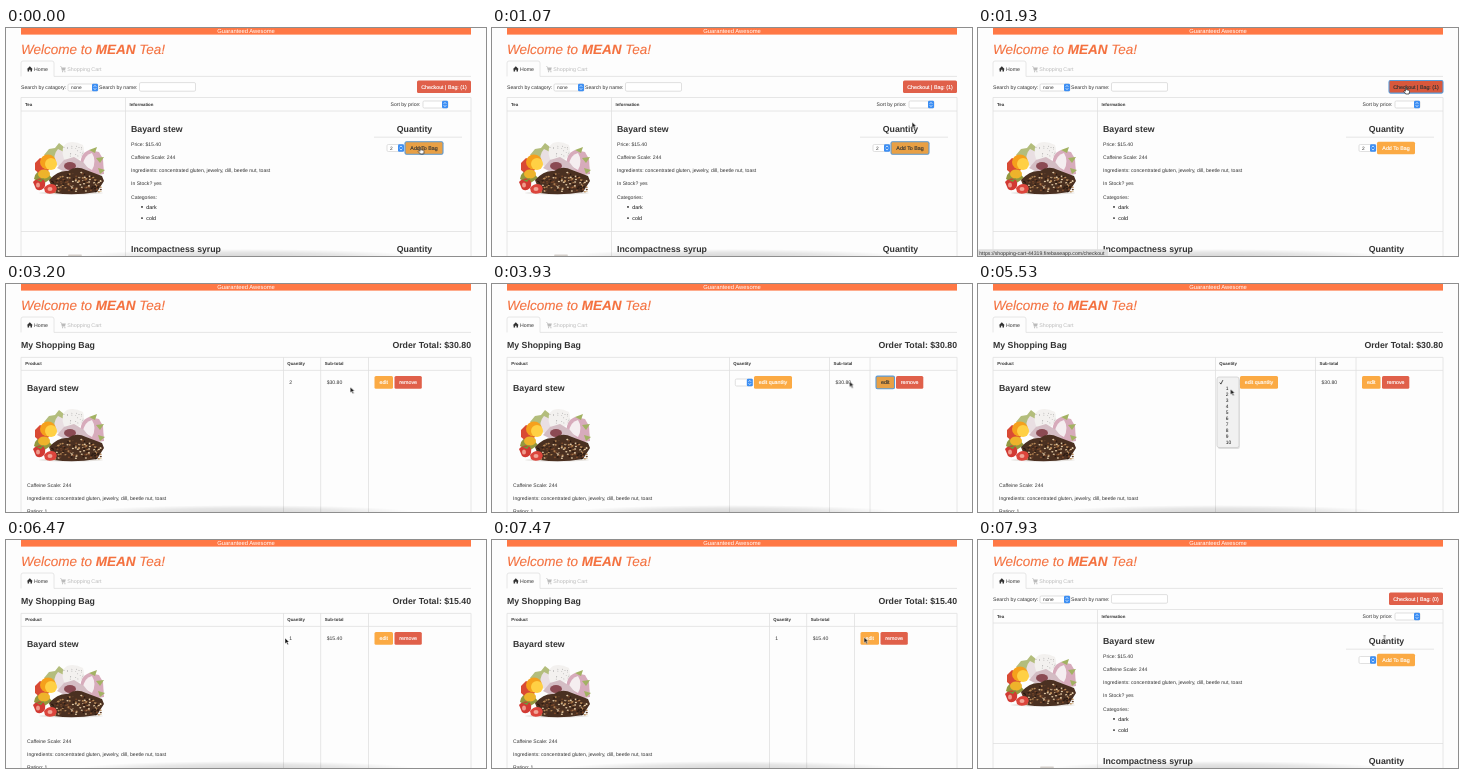
Write an HTML page that moves like this. It is 480 px wide and 228 px high and loops after 8000 ms.

```html
<!DOCTYPE html>
<html lang="en">
<head>
<meta charset="utf-8">
<title>Tea shop</title>
<style>
html, body { margin: 0; width: 100%; height: 100%; overflow: hidden; background: #fdfdfd; }
svg { display: block; width: 100%; height: 100%; }
text { font: 5.1px "Liberation Sans", Arial, sans-serif; fill: #333; text-rendering: geometricPrecision; white-space: pre; }
.title { font-size: 13.5px; font-style: italic; fill: #f4713f; stroke: #f4713f; stroke-width: .12; }
.h { font-size: 8.75px; font-weight: bold; }
.th { font-size: 4.35px; font-weight: bold; }
.btn { font-size: 5.3px; text-anchor: middle; stroke-width: .15; }
.mid { text-anchor: middle; }
.end { text-anchor: end; }
.line { fill: none; stroke: #e0e0e0; stroke-width: .8; }
.field { fill: #fff; stroke: #ccc; stroke-width: .6; }
.cursor { animation: travel 8s ease-in-out infinite; }
@keyframes travel {
  0%, 9% { transform: translate(414.5px, 119px); }
  18.75%, 33.75% { transform: translate(428px, 59px); }
  40% { transform: translate(344.3px, 103px); }
  43%, 46% { transform: translate(378px, 97px); }
  57%, 63% { transform: translate(257px, 99px); }
  67.5%, 73% { transform: translate(252.5px, 105px); }
  77%, 87.5% { transform: translate(279px, 98px); }
  96.5% { transform: translate(403px, 97px); }
  98.4%, 100% { transform: translate(406.5px, 98px); }
}
</style>
</head>
<body>
<svg id="stage" viewBox="0 0 480 228">
  <defs>
    <radialGradient id="shade">
      <stop offset="0" stop-color="#000" stop-opacity=".16"/>
      <stop offset=".6" stop-color="#000" stop-opacity=".09"/>
      <stop offset="1" stop-color="#000" stop-opacity="0"/>
    </radialGradient>
  </defs>
</svg>
<script>
const LOOP = 8000;
const ORANGE = ['#fbaa44', '#e8a045'], RED = ['#e0604a', '#d8583c'];
const T = { hoverCheckout: 1500, pressCheckout: 1860, bag: 2000, leaveLink: 2750, hoverEdit: 3380,
  edit: 3530, open: 4800, pick: 5900, hoverSave: 6080, save: 6270, hoverRemove: 7600, shop: 7870 };
const rules = [];

// Shows the markup only within the given [from, to] spans of the loop.
function during(spans, markup) {
  const name = 'phase' + rules.length;
  const pct = t => (t / LOOP * 100).toFixed(3) + '%';
  const start = spans[0][0] === 0 ? '' : '0% { opacity: 0 }';
  const steps = spans.map(([a, b]) => `${pct(a)} { opacity: 1 } ${pct(b)} { opacity: 0 }`).join(' ');
  rules.push(`@keyframes ${name} { ${start} ${steps} }
    .${name} { animation: ${name} ${LOOP}ms step-end infinite }`);
  return `<g class="${name}">${markup}</g>`;
}

const text = (x, y, str, cls = '', extra = '') => `<text x="${x}" y="${y}" class="${cls}" ${extra}>${str}</text>`;
const rect = (x, y, w, h, fill, r = 0, extra = '') =>
  `<rect x="${x}" y="${y}" width="${w}" height="${h}" rx="${r}" fill="${fill}" ${extra}/>`;
const path = (d, fill, extra = '') => `<path d="${d}" fill="${fill}" ${extra}/>`;
const line = d => `<path class="line" d="${d}"/>`;
const dot = (x, y, rx, ry, fill) => `<ellipse cx="${x}" cy="${y}" rx="${rx}" ry="${ry}" fill="${fill}"/>`;

function button(x, y, w, label, colors, { dark = false, ring = false } = {}) {
  const outline = ring ? 'stroke="#5b9bd8" stroke-width="1.1"' : '';
  const ink = dark ? '#333' : '#fff';
  return rect(x, y, w, 12.6, colors[+dark], 1.5, outline) +
    text(x + w / 2, y + 8.2, label, 'btn', `style="fill:${ink};stroke:${ink}"`);
}

function select(x, y, w, value = '') {
  const mid = x + w - 3;
  return `<rect class="field" x="${x}" y="${y}" width="${w}" height="7" rx="1.3"/>` +
    rect(x + w - 6, y - .2, 6, 7.4, '#3c8ef3', 1.3) +
    path(`M${mid - 1.3} ${y + 2.8}l1.3-1.4 1.3 1.4M${mid - 1.3} ${y + 4.2}l1.3 1.4 1.3-1.4`, 'none',
      'stroke="#fff" stroke-width=".7"') +
    text(x + 3, y + 5.3, value, '', 'style="font-size:4.8px"');
}

function fruit(dy) {
  let seed = 7;
  const rnd = () => (seed = seed * 16807 % 2147483647) / 2147483647;
  const tones = ['#7c4a2c', '#2b1a12', '#b98a58', '#e0c8a4', '#5a3a26'];
  let crumbs = '', seeds = '';
  for (let i = 0; i < 150; i++) {
    const across = rnd() * 2 - 1, depth = rnd();
    const x = 70 + across * 25, y = 164 - depth * (23 - 12 * Math.abs(across));
    crumbs += dot(x.toFixed(1), y.toFixed(1), 1.1, .8, tones[i % 5]);
  }
  for (let i = 0; i < 20; i++)
    seeds += dot((58 + rnd() * 20).toFixed(1), (118 + rnd() * 11).toFixed(1), .35, .35, '#666');
  return `<g transform="translate(0 ${dy})">` +
    dot(65, 165, 32, 1.5, '#e5e2df') +
    path('M38 127l5-6 6-1 4-5 5 4 2 9-12 6z', '#b3bd7c') +
    path('M50 137Q46 127 52 121L64 127 62 141Z', '#e9dfe2') +
    path('M58 131Q54 119 61 115Q68 112 77 117Q80 125 74 131L66 135Z', '#f3f1ef') + seeds +
    path('M75 139Q73 126 83 122L93 124 97 131 98 146 86 148Z', '#d7abbb') +
    path('M77 137Q78 127 86 125Q91 133 86 142Z', '#f5eef0') +
    path('M83 122l8-3-2 6zM90 130l8-1-4 6zM92 140l7 2-5 4z', '#a3b263') +
    path('M28 151q1-9 11-9l7 8-9 6z', '#93983f') +
    path('M29 135l5-5 7 3 2 9-8 5-6-5z', '#d94a34') +
    dot(42, 134, 8, 7.5, '#f5a01c') + dot(45, 136, 6, 6, '#ffd044') + dot(38, 146, 6, 4.5, '#eeb32b') +
    path('M51 140l7-8 10-3 10 6 7 9-20 3z', '#d4bdc4') + dot(64, 138, 6, 4, '#8b4a53') +
    path('M43 152Q52 142 62 143Q70 137 80 142L96 148 98 153 91 164Q68 168 48 165Z', '#4a3021') + crumbs +
    path('M27 154q4-5 10-3 4 4 1 9-4 4-8 1z', '#d23a33') +
    path('M38 160q5-6 11-3 4 4-1 8-6 2-9-1z', '#dc453c') +
    path('M29 151l5 1 4-2-3 4z', '#6d9a3a') + dot(32, 157, 2, 2.5, '#ef9a8c') + dot(44, 161, 2.5, 2, '#f0a496') + '</g>';
}

const header =
  rect(15, 0, 450, 6.6, '#ff7845') +
  text(240, 5, 'Guaranteed Awesome', 'mid', 'style="font-size:5.85px;fill:#fff"') +
  text(15, 26.3, 'Welcome to <tspan font-weight="bold">MEAN</tspan> Tea!', 'title') +
  line('M15 48.4V35q0-2 2-2H46q2 0 2 2V48.4H465') +
  path('M20.8 41.2l3-3 3 3h-.8v2.4h-1.5v-1.8h-1.4v1.8h-1.5v-2.4z', '#333') +
  text(28, 42.8, 'Home', '', 'style="font-size:5.2px"') +
  path('M54 38.5h1.4l.4 1h4l-.7 2.4h-2.8l.2.6h2.7v.5h-3.2l-1-4H54z', '#bbb') +
  dot(56.6, 43.7, .6, .6, '#bbb') + dot(58.9, 43.7, .6, .6, '#bbb') +
  text(61.3, 42.8, 'Shopping Cart', '', 'style="font-size:5.35px;fill:#bbb"');

const first = [[0, T.bag]], last = [[T.shop, LOOP]];
const checkout = (n, state) => button(411, 52.5, 54, `Checkout | Bag: (${n})`, RED, state);
const addToBag = state => button(399, 113.7, 38, 'Add To Bag', ORANGE, state);

const shopPage =
  text(15, 60.5, 'Search by catagory:') + select(62, 56, 30, 'none') +
  text(93, 60.5, 'Search by name:') +
  '<rect class="field" x="133.5" y="54.6" width="56" height="8.6" rx="1.3"/>' +
  line('M15 228V69.5H465V228M15 83H465M15 203.5H465M119.5 69.5V228') +
  text(19, 77.8, 'Tea', 'th') + text(123.5, 77.8, 'Information', 'th') +
  text(384.5, 78, 'Sort by price:') + select(417, 73, 25) +
  fruit(0) + rect(62, 226.5, 14, 1.5, '#d5d0cb', 1) +
  text(125, 104, 'Bayard stew', 'h') +
  ['Price: $15.40', 'Caffeine Scale: 244',
    'Ingredients: concentrated gluten, jewelry, dill, beetle nut, toast',
    'In Stock? yes', 'Categories:'].map((s, i) => text(125, 118 + i * 13.15, s)).join('') +
  ['dark', 'cold'].map((s, i) => dot(136, 178.9 + i * 11.2, .9, .9, '#222') +
    text(140.3, 180.6 + i * 11.2, s, '', 'style="font-size:5.3px;fill:#111"')).join('') +
  text(408.5, 104, 'Quantity', 'h mid') + line('M368 109.2H456') +
  text(125, 224.2, 'Incompactness syrup', 'h') + text(408.5, 224.2, 'Quantity', 'h mid') +
  addToBag() +
  during(first, select(381, 116.5, 17, '2') + checkout(1)) +
  during(last, select(381, 116.5, 17) + checkout(0)) +
  during([[0, T.pressCheckout]], addToBag({ dark: true, ring: true })) +
  during([[T.hoverCheckout, T.pressCheckout]], checkout(1, { dark: true })) +
  during([[T.pressCheckout, T.bag]], checkout(1, { dark: true, ring: true }));

const editButton = (x, state) => button(x + 6, 92.1, 18.5, 'edit', ORANGE, state);
const removeButton = (x, state) => button(x + 26, 92.1, 27.3, 'remove', RED, state);

// Column dividers sit at a, b and c.
const bagPage = (a, b, c, price, quantity) =>
  text(15, 64.2, 'My Shopping Bag', 'h') + text(465, 64.2, `Order Total: ${price}`, 'h end') +
  line(`M15 228V73.4H465V228M15 86.4H465M${a} 73.4V228M${b} 73.4V228M${c} 73.4V228`) +
  text(19.3, 81.4, 'Product', 'th') + text(a + 3.8, 81.4, 'Quantity', 'th') + text(b + 4, 81.4, 'Sub-total', 'th') +
  text(21, 107.4, 'Bayard stew', 'h') + fruit(11) +
  text(21, 203.4, 'Caffeine Scale: 244') +
  text(21, 216.4, 'Ingredients: concentrated gluten, jewelry, dill, beetle nut, toast') +
  text(21, 229.4, 'Rating: 1') +
  quantity + text(b + 6, 100.4, price) + editButton(c) + removeButton(c);

const saveButton = state => button(262, 92.1, 38, 'edit quantity', ORANGE, state);
const options = Array.from({ length: 10 }, (_, i) => text(247.7, 106.3 + i * 6, i + 1, '', 'style="font-size:4.9px;fill:#111"'));
const menu =
  rect(239.8, 94, 22, 71, '#000', 2, 'opacity=".12"') +
  rect(239, 93, 22, 70.5, '#f1f1f1', 2, 'stroke="#c4c4c4" stroke-width=".6"') +
  path('M241.8 98.6l1.1 1.5 2-4', 'none', 'stroke="#222" stroke-width=".8"') + options.join('');

const viewing = bagPage(277.5, 314.7, 362.5, '$30.80', text(283.3, 100.4, '2')) +
  during([[T.hoverEdit, T.edit]], editButton(362.5, { dark: true }));

const editing = bagPage(237.5, 337.5, 378, '$30.80', select(243.3, 95, 17.5) + saveButton()) +
  during([[T.edit, T.open]], editButton(378, { dark: true, ring: true })) +
  during([[T.open, T.pick]], menu) +
  during([[T.pick, T.save]], select(243.3, 95, 17.5, '1')) +
  during([[T.hoverSave, T.save]], saveButton({ dark: true }));

const saved = bagPage(277.5, 314.7, 362.5, '$15.40', text(283.3, 100.4, '1')) +
  during([[T.hoverRemove, T.shop]], removeButton(362.5, { dark: true }));

const statusBar = rect(0, 221.3, 130, 7, '#dedede', 1) +
  text(1.2, 226.6, 'https://shopping-cart-44319.firebaseapp.com/checkout', '', 'style="font-size:5.2px"');

const edge = 'stroke="#fff" stroke-width=".5" stroke-linejoin="round"';
const arrow = path('M0 0V5.8L1.4 4.5 2.4 6.7 3.5 6.2 2.5 4.1H4.2Z', '#111', edge);
const hand = path('M-.6 .6Q0-.2.6.6V2.8L3 3.3Q3.8 3.6 3.6 4.7L3 7H-.3L-2.2 4.2Q-2 3.2-.6 4.2Z', '#fff',
  'stroke="#111" stroke-width=".65" stroke-linejoin="round"');
const beam = path('M-1.1-2.6Q0-2.6 0-1.7Q0-2.6 1.1-2.6M0-1.8V3M-1.1 3.7Q0 3.7 0 2.8Q0 3.7 1.1 3.7', 'none',
  'stroke="#333" stroke-width=".6"');
const handOff = 3680;

document.getElementById('stage').insertAdjacentHTML('beforeend',
  header +
  during([first[0], last[0]], shopPage) +
  during([[T.bag, T.edit]], viewing) +
  during([[T.edit, T.save]], editing) +
  during([[T.save, T.shop]], saved) +
  dot(240, 229, 172, 8, 'url(#shade)') +
  during([[T.hoverCheckout, T.leaveLink]], statusBar) +
  '<g class="cursor">' +
  during([[0, 780], [T.hoverCheckout - 80, T.bag], [T.hoverEdit, handOff], [T.hoverSave, T.save], [T.hoverRemove, T.shop]], hand) +
  during([[780, T.hoverCheckout - 80], [T.bag, T.hoverEdit], [handOff, T.hoverSave], [T.save, T.hoverRemove]], arrow) +
  during(last, beam) + '</g>');

const sheet = document.createElement('style');
sheet.textContent = rules.join('\n');
document.head.append(sheet);
</script>
</body>
</html>
```
